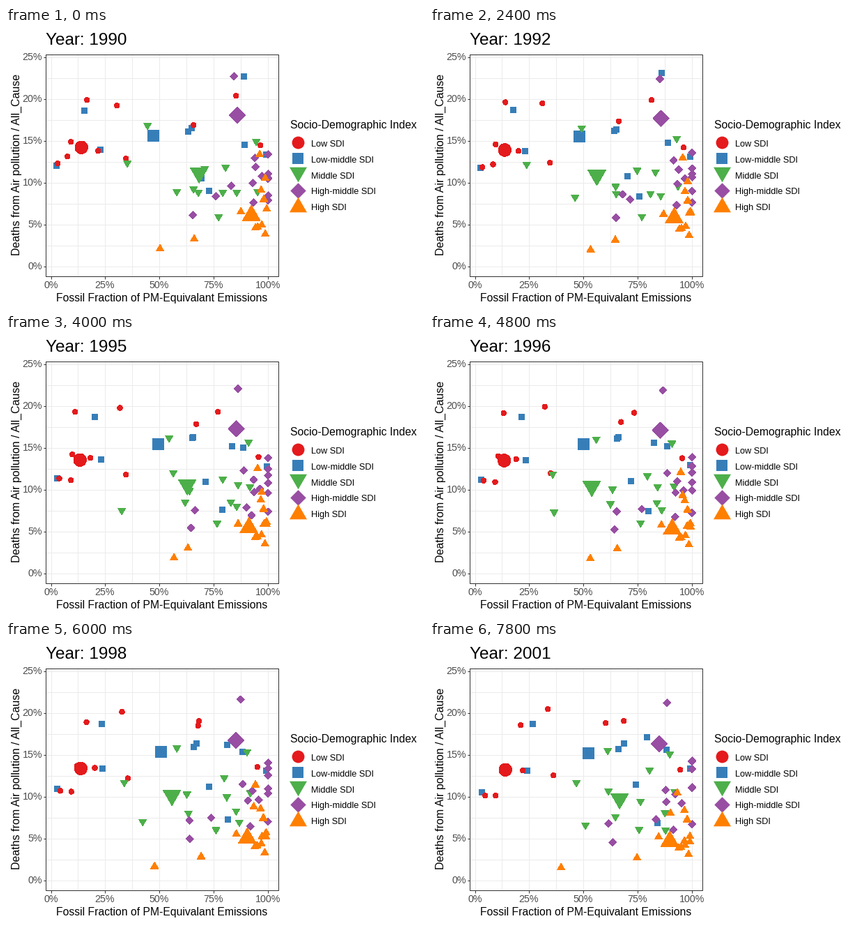
A matplotlib script that plays this animation: 600x400 px, repeating every 8000 ms.

```python
import numpy as np
import matplotlib.pyplot as plt
from matplotlib.animation import FuncAnimation

W, H, DPI = 600, 400, 100
FRAMES, STEP_MS, PAUSE = 40, 200, 5
LAST = FRAMES - 1 - PAUSE
STEPS_PER_YEAR = 3
MID = 5 * STEPS_PER_YEAR
SWINGS = (0, 4, 11, MID, 22, 29, LAST)  # turning points of erratic paths

plt.rcParams["font.family"] = "Liberation Sans"
fig = plt.figure(figsize=(W / DPI, H / DPI), dpi=DPI, facecolor="white")
ax = fig.add_axes([0, 0, 1, 1])
ax.set(xlim=(0, W), ylim=(H, 0))
ax.axis("off")


def pt(px):
    return px * 72 / DPI


def text(x, y, s, size, color="black", **kw):
    kw.setdefault("va", "baseline")
    return ax.text(x, y, s, fontsize=pt(size), color=color, **kw)


def line(xs, ys, color, z):
    ax.plot(xs, ys, color=color, lw=pt(1), zorder=z, solid_capstyle="butt")


# Marker shapes, centred on their bounding boxes
UP = [(0, 1.166), (1.347, -1.166), (-1.347, -1.166), (0, 1.166)]
DOWN = [(x, -y) for x, y in UP]
DIAMOND = [(0, 1), (1, 0), (0, -1), (-1, 0), (0, 1)]


class Group:
    """Countries of one index class; the group mean is added last."""

    def __init__(self, label, color, marker, small, big, z, drift=(0, 0)):
        self.label, self.color, self.marker = label, color, marker
        self.small, self.big, self.z = small, big, z
        self.drift = drift
        self.paths = []

    def add(self, *points, at=None):
        if len(points) == 1:
            (x, y), (dx, dy) = points[0], self.drift
            points = (x, y), (x + dx, y + dy)
        if at is None:
            at = (0, LAST) if len(points) == 2 else (0, MID, LAST)
        self.paths.append((at, *zip(*points)))

    def scatter(self, points, sizes, z):
        x, y = np.transpose(points) + 0.2
        return ax.scatter(x, y, s=np.square(pt(np.array(sizes))),
                          marker=self.marker, color=self.color, zorder=z,
                          linewidths=0, antialiased=False)

    def positions(self, k):
        return np.array([(np.interp(k, t, x), np.interp(k, t, y))
                         for t, x, y in self.paths])

    def start(self):
        sizes = [self.small] * (len(self.paths) - 1) + [self.big]
        self.dots = self.scatter(self.positions(0), sizes, self.z)

    def update(self, k):
        self.dots.set_offsets(self.positions(k) + 0.2)


low = Group("Low SDI", "#E41A1C", "o", 7.4, 18.4, 11, drift=(5, 26))
lowmid = Group("Low-middle SDI", "#377EB8", "s", 9, 17, 10, drift=(4, 10))
mid = Group("Middle SDI", "#4DAF4A", DOWN, 11, 25.5, 12, drift=(-13, -10))
highmid = Group("High-middle SDI", "#984EA3", DIAMOND, 10.5, 23, 13,
                drift=(-6, 19))
high = Group("High SDI", "#FF7F00", UP, 11, 25.5, 14, drift=(-1, 9))
GROUPS = [low, lowmid, mid, highmid, high]

low.add((74, 194))
low.add((88, 184), (93, 208), (94, 220))
low.add((93, 163), (95, 171), (108, 183))
low.add((116, 103), (99, 110), (130, 119))
low.add((159, 111), (169, 96))
low.add((132, 176), (121, 176), (133, 184))
low.add((172, 187), (172, 200), (177, 191))
low.add((269, 139), (278, 113))
low.add((330, 97), (304, 110), (252, 116))
low.add((365, 168), (359, 183))
low.add((108, 171), (106, 179), (108, 183))

lowmid.add((72, 197), (74, 215))
lowmid.add((112, 118), (147, 117))
lowmid.add((135, 174))
lowmid.add((266, 143))
lowmid.add((261, 148), (278, 145))
lowmid.add((341, 69), (327, 62), (324, 159), (311, 136),
           at=(0, 11, MID, LAST))
lowmid.add((342, 167), (339, 154))
lowmid.add((291, 233), (310, 250), (326, 259))
lowmid.add((280, 215), (295, 204))
lowmid.add((373, 181), (374, 188), (373, 181))
lowmid.add((211, 154), (227, 159))

mid.add((174, 195), (136, 196), (142, 198), (240, 199), (128, 202),
        (225, 204), (210, 203), at=SWINGS)
mid.add((203, 141), (234, 149), (255, 157))
mid.add((245, 236), (166, 253), (223, 264))
mid.add((269, 232), (256, 215))
mid.add((276, 237), (257, 241), (266, 252))
mid.add((285, 203), (311, 208), (315, 185))
mid.add((311, 237), (337, 246))
mid.add((331, 237), (331, 247), (338, 271))
mid.add((315, 201), (333, 216), (302, 230))
mid.add((305, 272), (300, 270))
mid.add((359, 164), (348, 155), (344, 162))
mid.add((361, 236), (350, 219), (351, 216))
mid.add((277, 211), (238, 213), (241, 217), (260, 218), (211, 222),
        (274, 225), (272, 228), at=SWINGS)

highmid.add((327, 69), (340, 87))
highmid.add((268, 268))
highmid.add((301, 241), (271, 251), (256, 260))
highmid.add((323, 226), (268, 234), (287, 244), (345, 247), (273, 251),
            (323, 253), (324, 254), at=SWINGS)
highmid.add((357, 186), (341, 194), (338, 212))
highmid.add((358, 199))
highmid.add((367, 212))
highmid.add((354, 222), (356, 225), (339, 229))
highmid.add((355, 250))
for y0, y1 in [(181, 170), (209, 171), (216, 182), (240, 209), (247, 261)]:
    highmid.add((376, y0), (376, y1))
highmid.add((376, 215), (376, 208))
highmid.add((332, 125), (329, 146))

high.add((364, 180), (361, 190), (355, 215))
high.add((221, 315), (241, 318), (188, 322))
high.add((270, 301), (261, 304), (297, 308))
high.add((337, 262), (328, 278))
high.add((372, 214), (367, 224), (345, 244))
for p in [(366, 231), (370, 245), (370, 244), (361, 284), (358, 285),
          (367, 281), (372, 294)]:
    high.add(p)
for x1, y1 in [(373, 277), (373, 285), (365, 284)]:
    high.add((374, 258), (x1, y1))
high.add((352, 265), (344, 282))

# Panel, grid and axes
L, R, T, B = 57, 391, 38, 356
GRID, DARK, GREY = "#EBEBEB", "#333333", "#4D4D4D"
for i in range(9):
    x = int(65 + i * 38.9)
    line([x, x], [T, B], GRID, 1)
    if i % 2 == 0:
        line([x, x], [B, B + 4], DARK, 3)
        text(x, 373, f"{i * 25 // 2}%", 14.2, GREY, ha="center")
for i in range(11):
    y = 342 - 30 * i
    line([L, R], [y, y], GRID, 1)
    if i % 2 == 0:
        line([L - 3, L], [y, y], DARK, 3)
        text(52, y + 4.5, f"{i * 5 // 2}%", 14.2, GREY, ha="right")
line([L, R, R, L, L], [T, T, B, B, T], DARK, 20)

text(224, 392, "Fossil Fraction of PM-Equivalant Emissions", 15.8, ha="center")
text(15, 196, "Deaths from Air pollution / All_Cause", 16,
     ha="center", va="center", rotation=90)
title = text(57, 24.5, "", 24.2)

# Legend
text(408, 144, "Socio-Demographic Index", 15.8)
for i, g in enumerate(GROUPS):
    y = 164 + 22.8 * i
    lift = 2.5 if g is high else 0
    g.scatter([(419, y - lift)], [g.big - 0.5], 5)
    text(438, y + 6, g.label, 12.8)
    g.start()


def draw(i):
    k = max(0, i - PAUSE)
    title.set_text(f"Year: {round(1990 + k / STEPS_PER_YEAR)}")
    for g in GROUPS:
        g.update(k)
    return []


anim = FuncAnimation(fig, draw, frames=FRAMES, init_func=lambda: draw(0),
                     interval=STEP_MS, repeat=True, repeat_delay=0)
plt.show()
```
